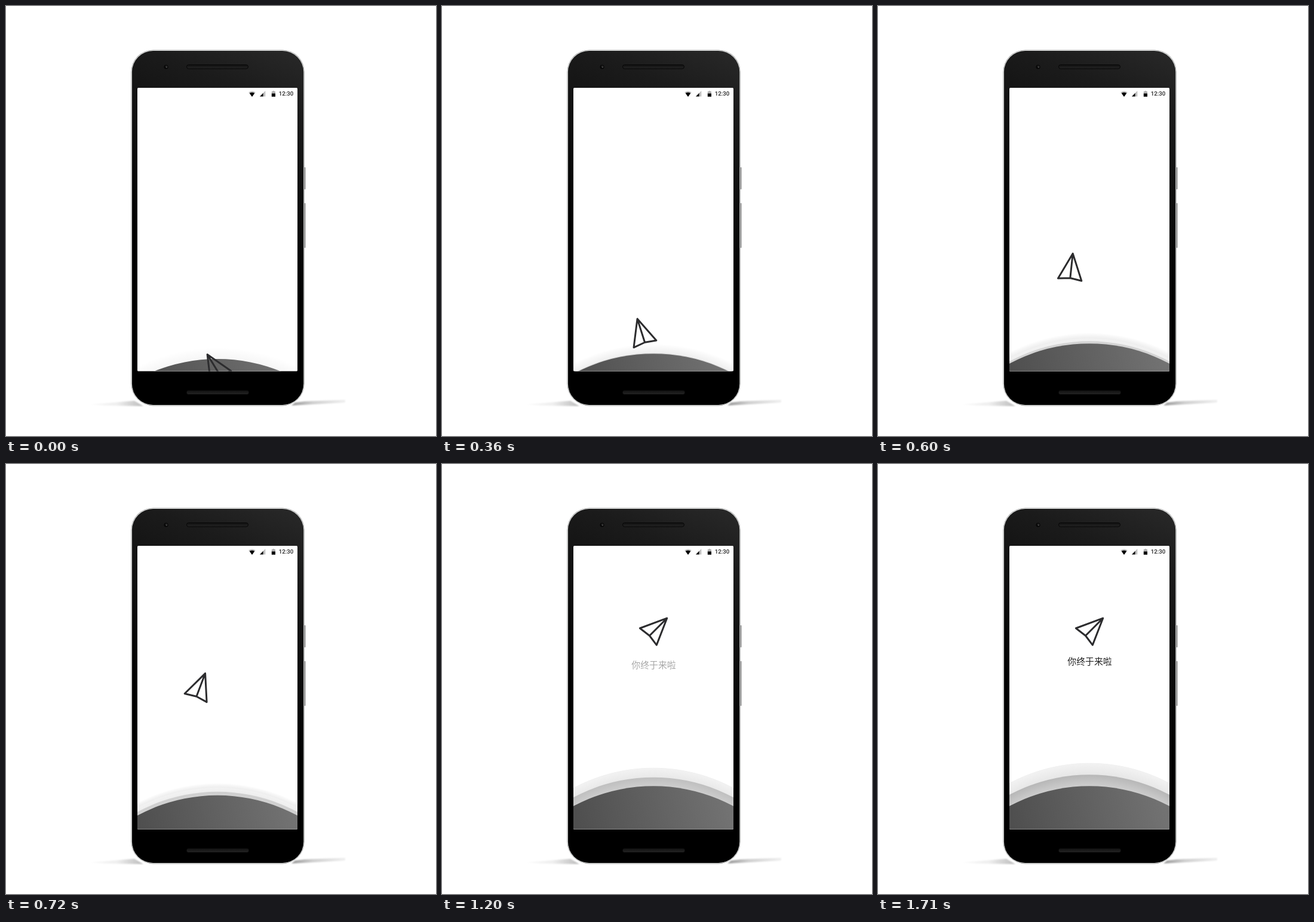
Recreate the animation shown at these times as an HTML page. Size 720 px wide and 720 px high, loop 1800 ms.

```html
<!DOCTYPE html>
<html lang="zh">
<head>
<meta charset="utf-8">
<title>Paper plane</title>
<style>
html, body { margin: 0; width: 100%; height: 100%; overflow: hidden; background: #fff; }
svg { display: block; width: 100%; height: 100%; }
</style>
</head>
<body>
<svg viewBox="0 0 720 720">
  <defs>
    <clipPath id="screen"><rect x="220" y="137" width="268" height="474.5" rx="1.5"/></clipPath>
    <linearGradient id="body" gradientUnits="userSpaceOnUse" x1="480" y1="75" x2="330" y2="420">
      <stop offset="0" stop-color="#282828"/>
      <stop offset=".25" stop-color="#1b1b1b"/>
      <stop offset="1" stop-color="#000"/>
    </linearGradient>
    <linearGradient id="slot" x1="0" y1="0" x2="0" y2="1">
      <stop offset="0" stop-color="#111"/>
      <stop offset="1" stop-color="#242424"/>
    </linearGradient>
    <linearGradient id="rightShade">
      <stop offset="0" stop-color="#999"/>
      <stop offset=".4" stop-color="#d0d0d0"/>
      <stop offset="1" stop-color="#f0f0f0"/>
    </linearGradient>
    <linearGradient id="leftShade">
      <stop offset="0" stop-color="#fafafa"/>
      <stop offset=".5" stop-color="#efefef"/>
      <stop offset="1" stop-color="#bbb"/>
    </linearGradient>
    <linearGradient id="dark" gradientUnits="userSpaceOnUse" x1="-125" y1="-205" x2="130" y2="-260">
      <stop offset="0" stop-color="#4f4f4f"/>
      <stop offset="1" stop-color="#737373"/>
    </linearGradient>
    <radialGradient id="mid" gradientUnits="userSpaceOnUse" cx="0" cy="0" r="283">
      <stop offset=".93" stop-color="#cecece"/>
      <stop offset="1" stop-color="#b7b7b7"/>
    </radialGradient>
    <radialGradient id="outer" gradientUnits="userSpaceOnUse" cx="0" cy="0" r="283">
      <stop offset=".93" stop-color="#e6e6e6"/>
      <stop offset="1" stop-color="#f2f2f2"/>
    </radialGradient>
    <radialGradient id="glow" gradientUnits="userSpaceOnUse" cx="0" cy="0" r="301">
      <stop id="glowIn"/>
      <stop id="glowMid"/>
      <stop offset="1" stop-opacity="0"/>
    </radialGradient>
    <filter id="soft" x="-20%" y="-100%" width="140%" height="300%"><feGaussianBlur stdDeviation="1.3"/></filter>
  </defs>

  <path d="M141 667L215 661L230 670L165 669Z" fill="url(#leftShade)" filter="url(#soft)"/>
  <path d="M484 664L500 662L568 659.5V664L515 667L478 669Z" fill="url(#rightShade)" filter="url(#soft)"/>
  <g fill="#777">
    <rect x="499.6" y="270" width="1.7" height="37" rx=".8"/>
    <rect x="499.6" y="330" width="1.7" height="75" rx=".8"/>
  </g>
  <rect x="209.5" y="73.5" width="290.2" height="595.9" rx="37" fill="#8a8a8a"/>
  <rect x="210" y="74.1" width="289.2" height="594.7" rx="36.4" fill="#eceeed"/>
  <rect x="210.9" y="75.1" width="287.4" height="592.9" rx="35.4" fill="url(#body)"/>
  <g fill="url(#slot)" stroke="#050505">
    <rect x="302.5" y="98.5" width="103" height="6.5" rx="3.2"/>
    <rect x="302" y="643.5" width="105" height="7" rx="3.5"/>
  </g>
  <circle cx="268" cy="102" r="3.6" fill="#070707"/>
  <circle cx="268.5" cy="101.5" r="2" fill="#222"/>
  <circle cx="269" cy="102.5" r=".9" fill="#555"/>

  <g clip-path="url(#screen)">
    <rect x="220" y="137" width="268" height="475" fill="#fff"/>
    <path d="M406.3 144.4Q412 140.6 417.7 144.4L412 152Z" fill="#c4c4c4"/>
    <path d="M407.7 146Q412 143.4 416.3 146L412 152Z" fill="#000"/>
    <path d="M425 151.5L434.3 142V151.5Z" fill="#c0c0c0"/>
    <path d="M425 151.5L430.6 145.8V151.5Z" fill="#111"/>
    <path d="M444.8 143H446.5V142H449.3V143H451V147H444.8Z" fill="#b4b4b4"/>
    <rect x="444.8" y="146.5" width="6.2" height="5.3" fill="#000"/>
    <text x="469" y="150.4" text-anchor="middle" font-family="Roboto, sans-serif" font-size="9.7" font-weight="500" fill="#222">12:30</text>

    <circle id="halo" fill="url(#glow)"/>
    <circle id="hill3" r="283" fill="url(#outer)"/>
    <circle id="hill2" r="283" fill="url(#mid)"/>
    <circle id="hill1" r="283" fill="url(#dark)"/>
    <path id="plane" d="M22.7 -22.8L-22.6 -6L-6.5 6.5L5.3 22.1ZL-6.5 6.5" fill="none" stroke="#2c2c2e" stroke-width="3" stroke-linejoin="round" stroke-linecap="round"/>
    <text id="hello" x="354.5" text-anchor="middle" font-family="'Noto Sans CJK SC', 'Noto Sans CJK', sans-serif" font-size="14.9" fill="#222">你终于来啦</text>
  </g>
</svg>
<script>
const LOOP = 1800, STEP = 30, CX = 354, R = 283;
const $ = id => document.getElementById(id);
const clamp = v => Math.max(0, Math.min(1, v));
const mix = (a, b, k) => a + (b - a) * k;
const set = (id, attrs) => {
  for (const k in attrs) $(id).setAttribute(k, attrs[k]);
};

// Smooth curve through [time, value] points, at rest at both ends.
function curve(t, pts) {
  const last = pts.length - 1;
  if (t >= pts[last][0]) return pts[last][1];
  const slope = i => i <= 0 || i >= last ? 0 :
    (pts[i + 1][1] - pts[i - 1][1]) / (pts[i + 1][0] - pts[i - 1][0]);
  let i = 0;
  while (t >= pts[i + 1][0]) i++;
  const [t0, a] = pts[i], [t1, b] = pts[i + 1];
  const d = t1 - t0, s = (t - t0) / d, s2 = s * s, s3 = s2 * s;
  return a * (2 * s3 - 3 * s2 + 1) + b * (3 * s2 - 2 * s3) +
    d * (slope(i) * (s3 - 2 * s2 + s) + slope(i + 1) * (s3 - s2));
}

const RISE = [[0, 0], [240, .074], [480, .308], [720, .698], [960, 1]];
const DRIFT = [[0, 354], [240, 344.6], [480, 329.3], [720, 322.2], [960, 354]];
const TURN = [[0, -76.5], [240, -69.8], [480, -52.6], [720, -24.2], [960, 0]];
const GAP2 = [[0, 0], [480, 2.2], [720, 6], [960, 11], [1380, 16.7], [1710, 19]];
const GAP3 = [[0, 0], [480, 5], [720, 13], [960, 22.3], [1380, 35], [1590, 38]];

function draw(t) {
  const rise = curve(t, RISE);
  const top = mix(591, 539.2, rise);
  const place = (id, gap) => set(id, { transform: `translate(${CX} ${top + R - gap})` });
  const gap3 = curve(t, GAP3);
  place("hill1", 0);
  place("hill2", curve(t, GAP2));
  place("hill3", gap3);
  place("halo", gap3);
  set("hill2", { opacity: mix(.15, 1, clamp(t / 1500)) });

  const spread = mix(19, 1, clamp(t / 1150));
  const glow = mix(.035, .07, clamp(t / 600));
  set("halo", { r: R + spread });
  set("glow", { r: R + spread });
  set("glowIn", { offset: R / (R + spread), "stop-opacity": glow });
  set("glowMid", { offset: (R + spread * .6) / (R + spread), "stop-opacity": glow * .45 });

  set("plane", {
    transform: `translate(${curve(t, DRIFT)} ${mix(611, 281, rise)}) rotate(${curve(t, TURN)})`
  });

  const show = clamp((t - 950) / 640);
  set("hello", { y: mix(346.6, 335.6, show), opacity: show });
}

let start;
function tick(now) {
  start ??= now;
  const t = Math.floor((now - start) % LOOP / STEP) * STEP;
  draw(t > 1590 && t < 1710 ? 1590 : t); // short hold before the last pose
  requestAnimationFrame(tick);
}
draw(0);
requestAnimationFrame(tick);
</script>
</body>
</html>
```
